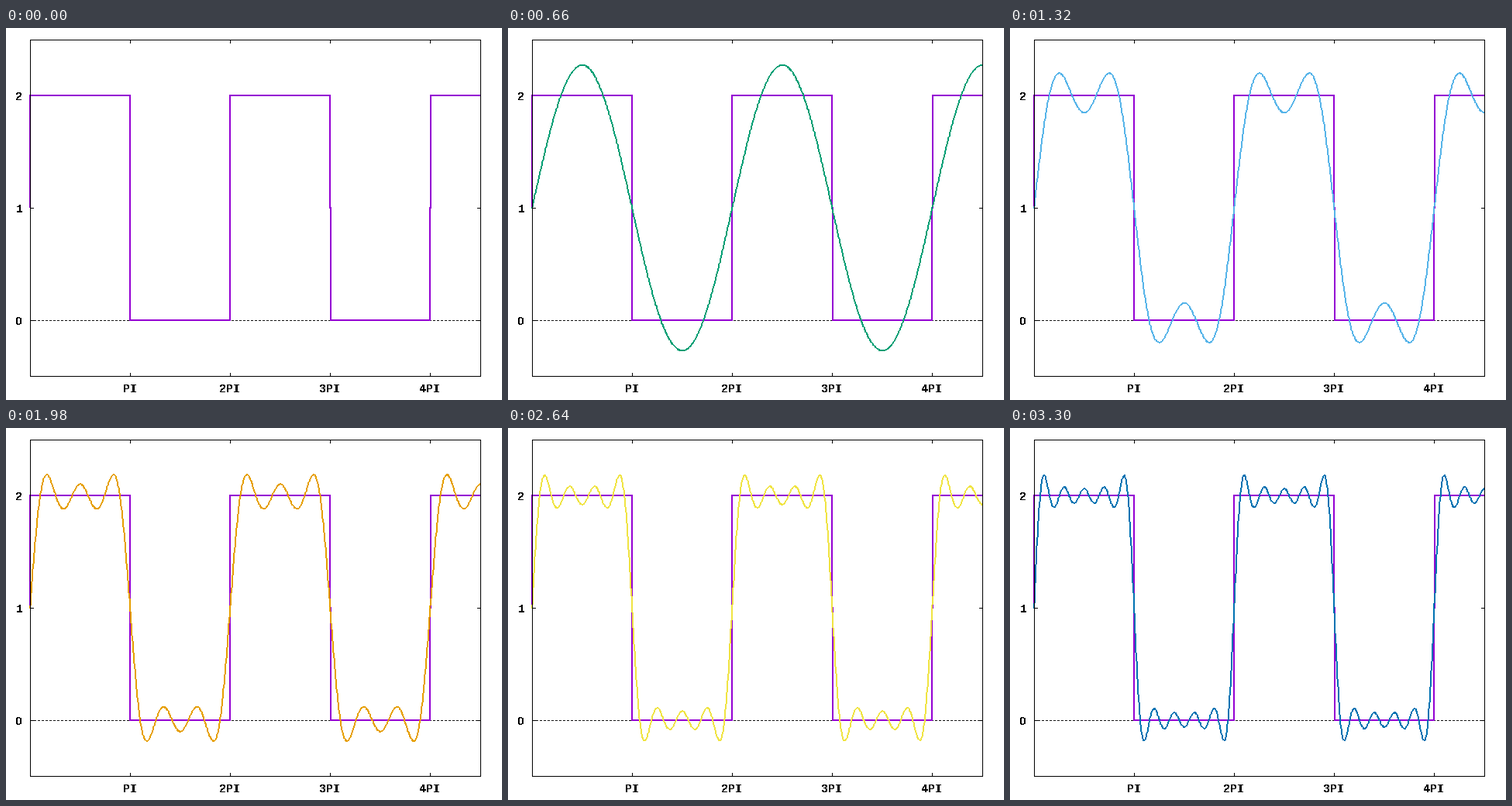
Animation of 640x480 px, one loop 3.96 s. Source, as a matplotlib script:

```python
import numpy as np
import matplotlib.pyplot as plt
from matplotlib.animation import FuncAnimation
from matplotlib.colors import to_rgba

W, H, DPI = 640, 480, 100
PX = 72 / DPI  # points per pixel
LEFT, RIGHT, TOP, BOTTOM = 31, 612, 15, 449
TICK = 5
COLORS = ["#009e73", "#56b4e9", "#e69f00", "#f0e442", "#0072b2"]

plt.rcParams["text.antialiased"] = False
plt.rcParams["path.simplify"] = False

fig = plt.figure(figsize=(W / DPI, H / DPI), dpi=DPI, facecolor="white")
ax = fig.add_axes([0, 0, 1, 1])
ax.set(xlim=(0, W), ylim=(H, 0))
ax.axis("off")


def to_x(t):
    return LEFT + (RIGHT - LEFT) * t / (4.5 * np.pi)


def to_y(v):
    return BOTTOM - (BOTTOM - TOP) * (v + 0.5) / 3


def stroke(xs, ys, color="black", width=1, **kw):
    style = dict(antialiased=False, snap=False, solid_capstyle="butt")
    ax.plot(xs, ys, color=color, lw=width * PX, **(style | kw))


def label(x, y, text):
    ax.text(x, y, text, family="Liberation Mono", weight="bold",
            size=15 * PX, ha="center", va="baseline")


def partial_sum(t, terms):
    odd = 2 * np.arange(terms)[:, None] + 1
    return 1 + 4 / np.pi * (np.sin(odd * t) / odd).sum(axis=0)


def trace(xs, ys, color):
    """Rasterise a hard-edged polyline, two pixels thick across its run."""
    image = np.zeros((H, W, 4))
    rgba = to_rgba(color)
    points = np.rint(np.column_stack([xs, ys])).astype(int)
    for (x0, y0), (x1, y1) in zip(points[:-1], points[1:]):
        dx, dy = abs(x1 - x0), abs(y1 - y0)
        steps = max(dx, dy) + 1
        px = np.rint(np.linspace(x0, x1, steps)).astype(int)
        py = np.rint(np.linspace(y0, y1, steps)).astype(int)
        image[py, px] = rgba
        if dx >= dy:
            image[py - 1, px] = rgba
        else:
            image[py, px - 1] = rgba
    return image


# dotted zero axis
zero_y = round(to_y(0)) + 0.5
stroke([LEFT, RIGHT], [zero_y, zero_y], dashes=(3, 2),
       dash_capstyle="butt", antialiased=True)

# inward ticks on all four sides
for k in range(1, 5):
    x = round(to_x(k * np.pi))
    stroke([x + 0.5] * 2, [TOP, TOP + TICK])
    stroke([x + 0.5] * 2, [BOTTOM + 1 - TICK, BOTTOM + 1])
    label(x, 470, "PI" if k == 1 else f"{k}PI")
for v, text in enumerate("O12"):  # round, undotted zero
    y = round(to_y(v))
    stroke([LEFT, LEFT + TICK], [y + 0.5] * 2)
    stroke([RIGHT + 1 - TICK, RIGHT + 1], [y + 0.5] * 2)
    label(17, y + 6, text)

# square wave; the last two edges lean by one pixel
low, mid, high = (round(to_y(v)) for v in range(3))
square_x = [31, 31, 160, 160, 289, 289, 418, 418, 419, 419,
            547, 547, 548, 548, RIGHT]
square_y = [mid, high, high, low, low, high, high, mid, mid, low,
            low, mid, mid, high, high]
stroke(square_x, square_y, "#9400d3", 2, solid_joinstyle="miter")

t = np.linspace(0, 4.5 * np.pi, 1000)
blank = np.zeros((H, W, 4))
curve = ax.imshow(blank, extent=(0, W, H, 0), aspect="auto",
                  interpolation="nearest", zorder=3)

stroke([LEFT + 0.5, RIGHT + 0.5, RIGHT + 0.5, LEFT + 0.5, LEFT + 0.5],
       [TOP + 0.5, TOP + 0.5, BOTTOM + 0.5, BOTTOM + 0.5, TOP + 0.5],
       solid_joinstyle="miter", zorder=4)


def update(terms):
    if terms == 0:
        curve.set_data(blank)
    else:
        curve.set_data(trace(to_x(t), to_y(partial_sum(t, terms)),
                             COLORS[terms - 1]))
    return [curve]


anim = FuncAnimation(fig, update, frames=6, interval=660, repeat=True,
                     repeat_delay=0, blit=False)
plt.show()
```
